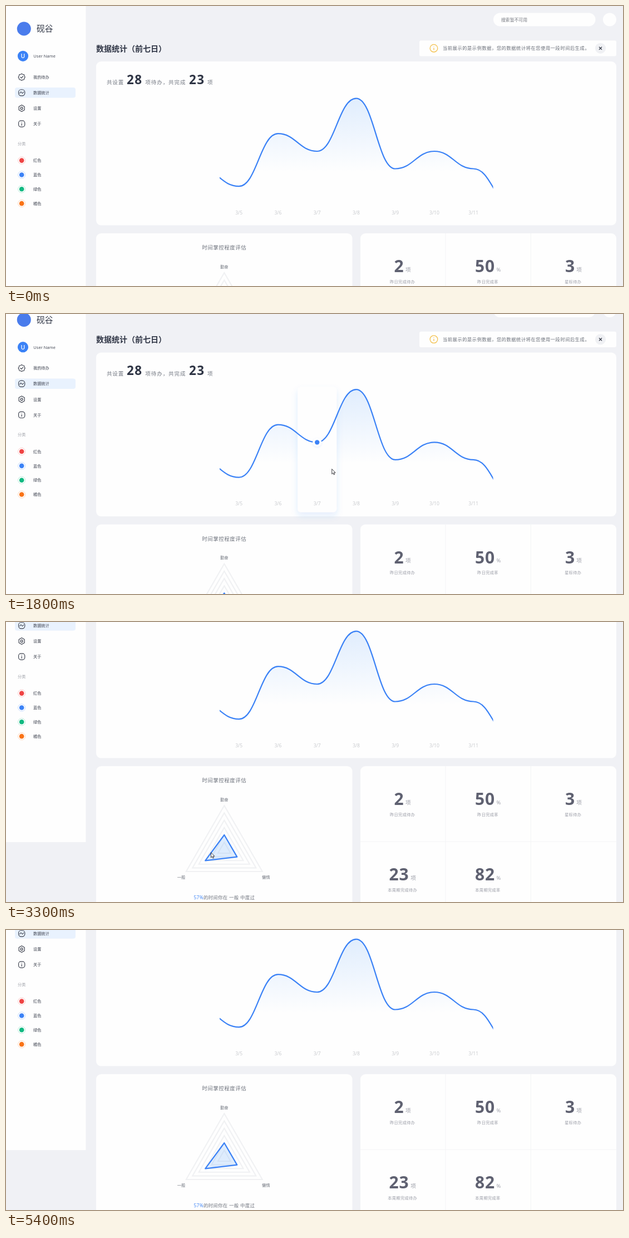
Recreate the animation shown at these times as an HTML page. Size 1109x505 px, loop 5.81 s.

```html
<!DOCTYPE html>
<html lang="zh-CN">
<head>
<meta charset="utf-8">
<title>数据统计</title>
<style>
  html, body { margin: 0; width: 100%; height: 100%; overflow: hidden; background: #f0f1f5; }
  svg { display: block; position: absolute; left: 0; top: 0; }
  text { font-family: "Open Sans", "Noto Sans CJK SC", "Noto Sans CJK", sans-serif; white-space: pre; }
  .card { fill: #fefefe; }
  .icon { fill: none; stroke: #3a3f4c; stroke-width: 1.15; stroke-linecap: round; stroke-linejoin: round; }
  .rule { stroke: #f3f4f6; }
  .ring { fill: none; stroke: #f0f1f3; stroke-width: 2; }
  .curve { fill: none; stroke: #3b82f6; stroke-width: 2.2; }
</style>
</head>
<body>
<svg id="stage" width="1109" height="505" viewBox="0 0 1109 505">
  <defs>
    <linearGradient id="fade" gradientUnits="userSpaceOnUse" x1="0" y1="166" x2="0" y2="300">
      <stop offset="0" stop-color="#60a5fa" stop-opacity=".19"/>
      <stop offset="1" stop-color="#60a5fa" stop-opacity="0"/>
    </linearGradient>
    <filter id="glow" x="-50%" y="-20%" width="200%" height="140%">
      <feDropShadow dx="0" dy="6" stdDeviation="6" flood-color="#3b82f6" flood-opacity=".13"/>
    </filter>
    <filter id="soft" x="-50%" y="-50%" width="200%" height="200%">
      <feDropShadow dx="0" dy="1" stdDeviation="1.5" flood-color="#3b82f6" flood-opacity=".16"/>
    </filter>
    <clipPath id="plot"><rect x="384" y="150" width="491.6" height="240"/></clipPath>
    <clipPath id="statClip"><rect x="637" y="410" width="460" height="272" rx="9"/></clipPath>
  </defs>
  <g id="page"></g>
  <path id="cursor" d="M.5 .5V9.6L2.6 7.7L4 10.9L5.5 10.2L4.1 7.2H6.9Z" fill="#fff" stroke="#2b2b30" stroke-width=".9"/>
</svg>
<script>
const LOOP = 5810, BLUE = '#3b82f6';

const text = (x, y, size, fill, str, o = {}) =>
  `<text x="${x}" y="${y}" font-size="${size}" fill="${fill}" font-weight="${o.w || 400}"
    letter-spacing="${o.ls || 0}" text-anchor="${o.a || 'start'}">${str}</text>`;
const rect = (x, y, w, h, r, cls = 'class="card"') =>
  `<rect x="${x}" y="${y}" width="${w}" height="${h}" rx="${r}" ${cls}/>`;
const circle = (x, y, r, attrs) => `<circle cx="${x}" cy="${y}" r="${r}" ${attrs}/>`;
const mid = { a: 'middle' };

// ---- sidebar ----
const icons = [
  '<path d="M0-6L1.9-4.9L4.2-4.6L4.8-2.2L6 0L4.8 2.2L4.2 4.6L1.9 4.9L0 6L-1.9 4.9L-4.2 4.6L-4.8 2.2L-6 0L-4.8-2.2L-4.2-4.6L-1.9-4.9ZM-2.3 .1L-.6 1.8L2.5-1.6"/>',
  '<rect x="-5.6" y="-5.6" width="11.2" height="11.2" rx="4.6"/><path d="M-3.4 1.2C-2-2.4-.9-1.6 0 0S2 1.8 3.4-1.2"/>',
  '<path d="M0-5.9L5-3V3L0 5.9L-5 3V-3Z"/><circle r="2"/>',
  '<rect x="-5.6" y="-5.6" width="11.2" height="11.2" rx="4"/><path d="M0-.4V2.8M0-2.7V-2.6"/>'
];
const menu = ['我的待办', '数据统计', '设置', '关于'];
const tags = [['红色', '#ef4444'], ['蓝色', BLUE], ['绿色', '#10b981'], ['橘色', '#f97316']];

const sidebar = () =>
  rect(0, 0, 143.5, 547, 0) +
  circle(32.3, 41, 12.5, 'fill="#4a7cec"') +
  text(55, 46.3, 14.7, '#2f3545', '砚谷', { w: 500 }) +
  circle(30.5, 90.3, 9.6, `fill="${BLUE}"`) +
  text(30.5, 94.1, 10.5, '#fff', 'U', { a: 'middle', w: 600 }) +
  text(49.3, 93.3, 7.4, '#3a3f4c', 'User Name', { ls: .1 }) +
  rect(16, 147, 109, 18.6, 4, 'fill="#e9f2fe"') +
  menu.map((name, i) => {
    const y = 128.2 + 28.1 * i;
    return `<g class="icon" transform="translate(28.2 ${y})">${icons[i]}</g>` +
      text(49, y + 2.7, 7.15, '#3a3f4c', name);
  }).join('') +
  text(21, 250.9, 7.2, '#a0a3aa', '分类') +
  tags.map(([name, color], i) => {
    const y = 278.6 + 25.85 * i;
    return circle(28.2, y, 6.5, `fill="#fff" stroke="${color}" stroke-opacity=".28"`) +
      circle(28.2, y, 4.3, `fill="${color}"`) +
      text(49, y + 2.7, 7.15, '#3a3f4c', name);
  }).join('');

// ---- top bar and notice ----
const header = () =>
  rect(876, 12.5, 183.5, 24, 12) +
  text(890, 27.5, 7.85, '#74777f', '搜索暂不可用') +
  circle(1085, 24.5, 12, 'class="card"') +
  text(162, 81.8, 14, '#2f3545', '数据统计（前七日）', { w: 700 }) +
  rect(743, 62.3, 354, 28.2, 3) +
  circle(769, 76.2, 6.8, 'fill="none" stroke="#f3c04b" stroke-width="1.3"') +
  '<path d="M769 75.4V79.4M769 72.7V73.6" stroke="#f3c04b" stroke-width="1.3"/>' +
  text(785, 79.3, 8.2, '#676c76', '当前展示的是示例数据，您的数据统计将在您使用一段时间后生成。', { ls: .62 }) +
  circle(1068.5, 76.3, 9.6, 'fill="#f0f1f4"') +
  '<path d="M1066 73.8L1071 78.8M1071 73.8L1066 78.8" stroke="#3a3f4c" stroke-width="1.3"/>';

// ---- line chart ----
const STEP = 70.25, X0 = 418.7;
const levels = [293.5, 325.2, 230.2, 262, 166.7, 293.5, 262, 293.5, 360];
const dayX = i => X0 + STEP * i;
const curve = levels.map((y, i) => {
  const x = dayX(i - 1), k = STEP * .45;
  return i ? `C${x - STEP + k} ${levels[i - 1]} ${x - k} ${y} ${x} ${y}` : `M${x} ${y}`;
}).join('');
const days = [0, 1, 2, 3, 4, 5, 6];

const chart = () =>
  rect(162, 100, 935, 295.6, 9) +
  text(181, 141.2, 9.5, '#747983', '共设置', { ls: .85 }) +
  text(217, 141, 22.4, '#2f3545', '28', { w: 700, ls: 1.5 }) +
  text(250.3, 141.2, 9.5, '#747983', '项待办，共完成', { ls: .95 }) +
  text(329, 141, 22.4, '#2f3545', '23', { w: 700, ls: 1.5 }) +
  text(362, 141.2, 9.5, '#747983', '项') +
  `<path d="${curve}V400H${dayX(-1)}Z" fill="url(#fade)" clip-path="url(#plot)"/>` +
  days.map(i => `<g id="col${i}" opacity="0">` +
    rect(dayX(i) - 35, 162, 70, 226, 6, 'fill="#fefefe" filter="url(#glow)"') + '</g>').join('') +
  `<path class="curve" d="${curve}" clip-path="url(#plot)"/>` +
  days.map(i => {
    const x = dayX(i), y = levels[i + 1];
    return `<g id="dot${i}" opacity="0">` +
      circle(x, y, 8, 'fill="#fefefe" filter="url(#soft)"') +
      circle(x, y, 4.2, `fill="${BLUE}"`) + '</g>' +
      text(x, 375.7, 8.6, '#c6c8cc', `3/${i + 5}`, mid);
  }).join('');

// ---- radar ----
const HUB = { x: 392.3, y: 560.4 };
const ring = s => `<path class="ring" d="M${HUB.x} ${HUB.y - 79.3 * s}L${HUB.x + 68.5 * s} ${HUB.y + 39.6 * s}H${HUB.x - 68.5 * s}Z"/>`;

const radar = () =>
  rect(162, 410, 460.5, 300, 9) +
  text(392.3, 439.4, 9.4, '#6c717b', '时间掌控程度评估', { a: 'middle', ls: .6 }) +
  text(392.3, 473, 7.3, '#6c717b', '勤奋', mid) +
  [1, 2, 3, 4, 5, 6].map(n => ring(n / 6)).join('') +
  `<path d="M392.3 534L415.3 573.6L358.2 580.3Z" fill="#60a5fa" fill-opacity=".2" stroke="${BLUE}" stroke-width="2.2" stroke-linejoin="round"/>` +
  text(315, 613.2, 7.3, '#6c717b', '一般', mid) +
  text(467.3, 613.2, 7.3, '#6c717b', '懒惰', mid) +
  text(392.3, 650.2, 8.4, '#6c717b', `<tspan fill="${BLUE}">57%</tspan>的时间你在 一般 中度过`, { a: 'middle', ls: .35 });

// ---- stat tiles: number x, number, unit x, unit, label ----
const stats = [
  [697.5, '2', 718, '项', '昨日完成待办'],
  [843, '50', 881.5, '%', '昨日完成率'],
  [1005, '3', 1025.3, '项', '星标待办'],
  [688.5, '23', 727.3, '项', '本周期完成待办'],
  [843, '82', 881.5, '%', '本周期完成率']
];
const TILE_W = 153.3, TILE_H = 136;
const tileX = i => 637 + TILE_W * (i % 3);
const tileY = i => 410 + TILE_H * Math.floor(i / 3);

const tiles = () =>
  rect(637, 410, 460, 300, 9) +
  '<g clip-path="url(#statClip)">' +
  stats.map((_, i) => `<g id="tile${i}" opacity="0">` +
    rect(tileX(i), tileY(i), TILE_W, TILE_H, 0, 'fill="#f9f9fa"') + '</g>').join('') + '</g>' +
  '<path class="rule" d="M790 410V710M943.3 410V710M637 546H1097"/>' +
  stats.map(([nx, num, ux, unit, label], i) => {
    const y = tileY(i) + 70.2;
    return text(nx, y, 30, '#5f6171', num, { w: 700, ls: .9 }) +
      text(ux, y - 1.2, 9.6, '#9b9da7', unit) +
      text(tileX(i) + TILE_W / 2 - 1, y + 19.6, 7.2, '#9b9da7', label, { a: 'middle', ls: .35 });
  }).join('');

const $ = id => document.getElementById(id);
$('page').innerHTML = header() + chart() + radar() + tiles() + sidebar();

// ---- motion ----
// Pointer path as time, x, y; scroll as time, offset.
const path = [
  [70, 1052, 499], [250, 985, 410], [450, 865, 305], [630, 733, 240], [800, 500, 198],
  [890, 383, 182], [960, 361, 178], [1090, 312, 164], [1270, 312, 164], [1400, 345, 190],
  [1600, 470, 250], [1700, 545, 274], [1800, 585, 279], [2000, 623, 282], [2130, 643, 283],
  [2310, 643, 283], [2510, 600, 284], [2870, 506, 296], [3060, 430, 335], [3240, 345, 396],
  [3330, 385, 419], [3500, 505, 407], [3800, 760, 350], [4050, 911, 318], [4140, 930, 317],
  [4330, 1004, 360], [4500, 910, 425], [4700, 762, 459], [4860, 682, 474], [5000, 740, 486],
  [5150, 880, 491], [5300, 1048, 494], [5390, 1070, 501]
];
const scroll = [
  [1755, 0], [1800, 30], [1850, 56], [1900, 86], [1940, 110], [2000, 127.7], [2060, 140], [2130, 150]
];

// Monotone cubic through the keys, so that rests stay still.
function ease(keys, t, k) {
  const n = keys.length - 1;
  if (t <= keys[0][0]) return keys[0][k];
  if (t >= keys[n][0]) return keys[n][k];
  const i = keys.findIndex(p => p[0] > t) - 1;
  const secant = j => (keys[j + 1][k] - keys[j][k]) / (keys[j + 1][0] - keys[j][0]);
  const slope = j => {
    if (j === 0) return secant(0);
    if (j === n) return secant(n - 1);
    const a = secant(j - 1), b = secant(j);
    return a * b > 0 ? 2 * a * b / (a + b) : 0;
  };
  const h = keys[i + 1][0] - keys[i][0], u = (t - keys[i][0]) / h, v = 1 - u;
  return keys[i][k] * v * v * (1 + 2 * u) + keys[i + 1][k] * u * u * (3 - 2 * u) +
    h * u * v * (v * slope(i) - u * slope(i + 1));
}

const zones = [
  ...days.map(i => ({ x: dayX(i) - 35, y: 162, w: 70, h: 226, els: [$('col' + i), $('dot' + i)] })),
  ...stats.map((_, i) => ({ x: tileX(i), y: tileY(i), w: TILE_W, h: TILE_H, els: [$('tile' + i)] }))
];
const shown = t => t >= 70 && t < 5390;

// Hover strength is the share of the last moments spent inside a zone.
function hover(t) {
  const trail = [0, 15, 30, 45].map(d => t - d).map(s => shown(s) &&
    { x: ease(path, s, 1), y: ease(path, s, 2) + ease(scroll, s, 1) });
  for (const z of zones) {
    const hits = trail.filter(p => p && p.x >= z.x && p.x < z.x + z.w && p.y >= z.y && p.y < z.y + z.h);
    z.els.forEach(el => el.setAttribute('opacity', hits.length / trail.length));
  }
}

const start = performance.now();
function draw() {
  const t = (performance.now() - start) % LOOP;
  $('page').setAttribute('transform', `translate(0 ${-ease(scroll, t, 1)})`);
  $('cursor').setAttribute('transform', `translate(${ease(path, t, 1)} ${ease(path, t, 2)})`);
  $('cursor').setAttribute('visibility', shown(t) ? 'visible' : 'hidden');
  hover(t);
  requestAnimationFrame(draw);
}
draw();
</script>
</body>
</html>
```
